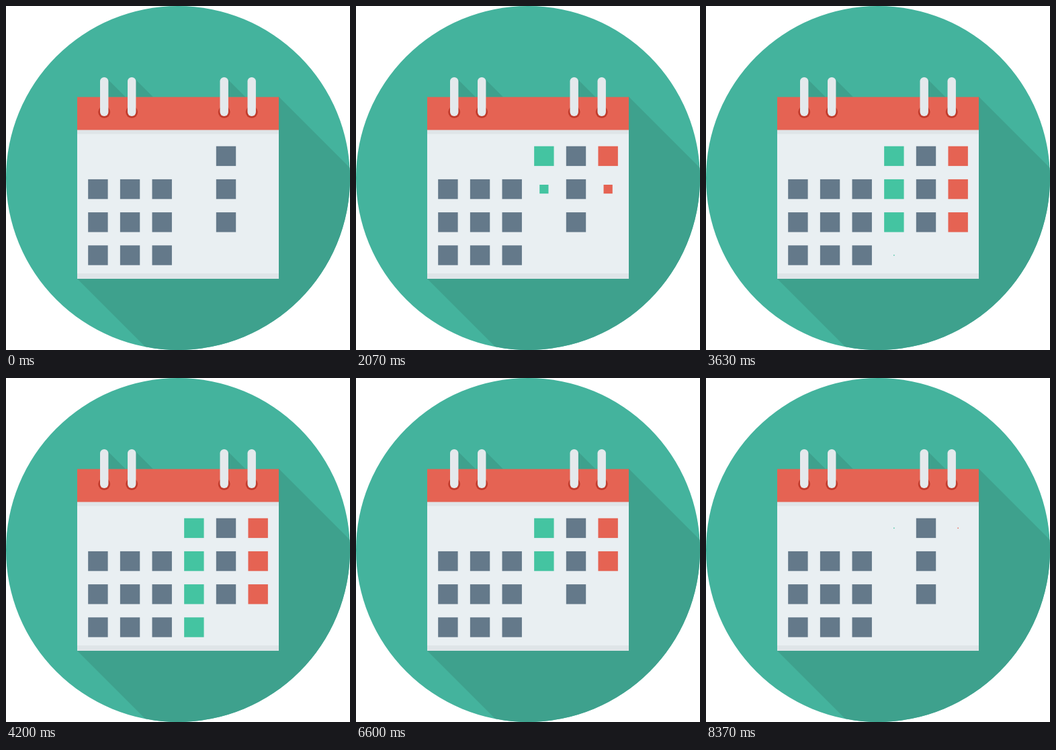
An HTML page that plays this animation: 512 px wide and 512 px high, repeating every 8.4 s.

```html
<!DOCTYPE html>
<html lang="en">
<head>
<meta charset="utf-8">
<title>Calendar</title>
<style>
  html, body { margin: 0; width: 100%; height: 100%; overflow: hidden; background: #fff; }
  svg { display: block; width: 100vw; height: 100vh; }
</style>
</head>
<body>
<svg viewBox="0 0 512 512">
  <clipPath id="disc"><circle cx="256" cy="256" r="256"/></clipPath>
  <circle cx="256" cy="256" r="256" fill="#44b39d"/>
  <g fill="#3ea18d" clip-path="url(#disc)">
    <path d="M406 135 L512 241 V512 H212 L106 406Z"/>
    <path d="M150 107.500 L178 135.500 H150Z M191 107.500 L219 135.500 H191Z M328.500 107.500 L356.500 135.500 H328.500Z"/>
  </g>
  <path fill="#e9eff2" d="M106 184H406V406H106Z"/>
  <path fill="#dfe5e8" d="M106 184H406V190.500H106Z M106 398H406V406H106Z"/>
  <path fill="#e56353" d="M106 135.500H406V184.500H106Z"/>
  <g id="rings"></g>
  <g id="days"></g>
</svg>
<script>
const LOOP = 8400, STEP = 30, FADE = 600, BEAT = 900;
const SIZE = 29.4;
const SLATE = '#64798a', GREEN = '#44c4a1', RED = '#e56353';

function add(parentId, tag, attrs) {
  const el = document.createElementNS('http://www.w3.org/2000/svg', tag);
  for (const key in attrs) el.setAttribute(key, attrs[key]);
  return document.getElementById(parentId).appendChild(el);
}

function place(el, col, row, scale) {
  const size = SIZE * scale;
  el.setAttribute('x', 136.9 + 47.65 * col - size / 2);
  el.setAttribute('y', 223.4 + 49.2 * row - size / 2);
  el.setAttribute('width', size);
  el.setAttribute('height', size);
}

for (const x of [146.2, 187.2, 324.7, 365.7]) {
  add('rings', 'circle', { cx: x, cy: 157.8, r: 9, fill: '#c13b2c' });
  add('rings', 'rect', { x: x - 6.2, y: 106, width: 12.4, height: 58, rx: 6.2, fill: '#e4e9ec' });
}

const growing = [];
for (let row = 0; row < 4; row++) {
  for (let col = 0; col < 6; col++) {
    if (row === 0 && col < 3 || row === 3 && col > 3) continue;
    const fill = col === 3 ? GREEN : col === 5 ? RED : SLATE;
    const el = add('days', 'rect', { fill });
    place(el, col, row, 1);
    if (fill !== SLATE) growing.push({ el, col, row });
  }
}

const progress = (t, start) => Math.min(1, Math.max(0, (t - start) / FADE));

// Rows grow from top to bottom, then shrink from bottom to top.
function draw(now) {
  const t = Math.floor(now % LOOP / STEP) * STEP;
  for (const { el, col, row } of growing) {
    const grown = progress(t, BEAT * (row + 1));
    const shrunk = progress(t, 7800 - BEAT * row);
    place(el, col, row, grown - shrunk);
  }
}

const start = performance.now();
function tick() {
  draw(performance.now() - start);
  requestAnimationFrame(tick);
}
tick();
</script>
</body>
</html>
```
